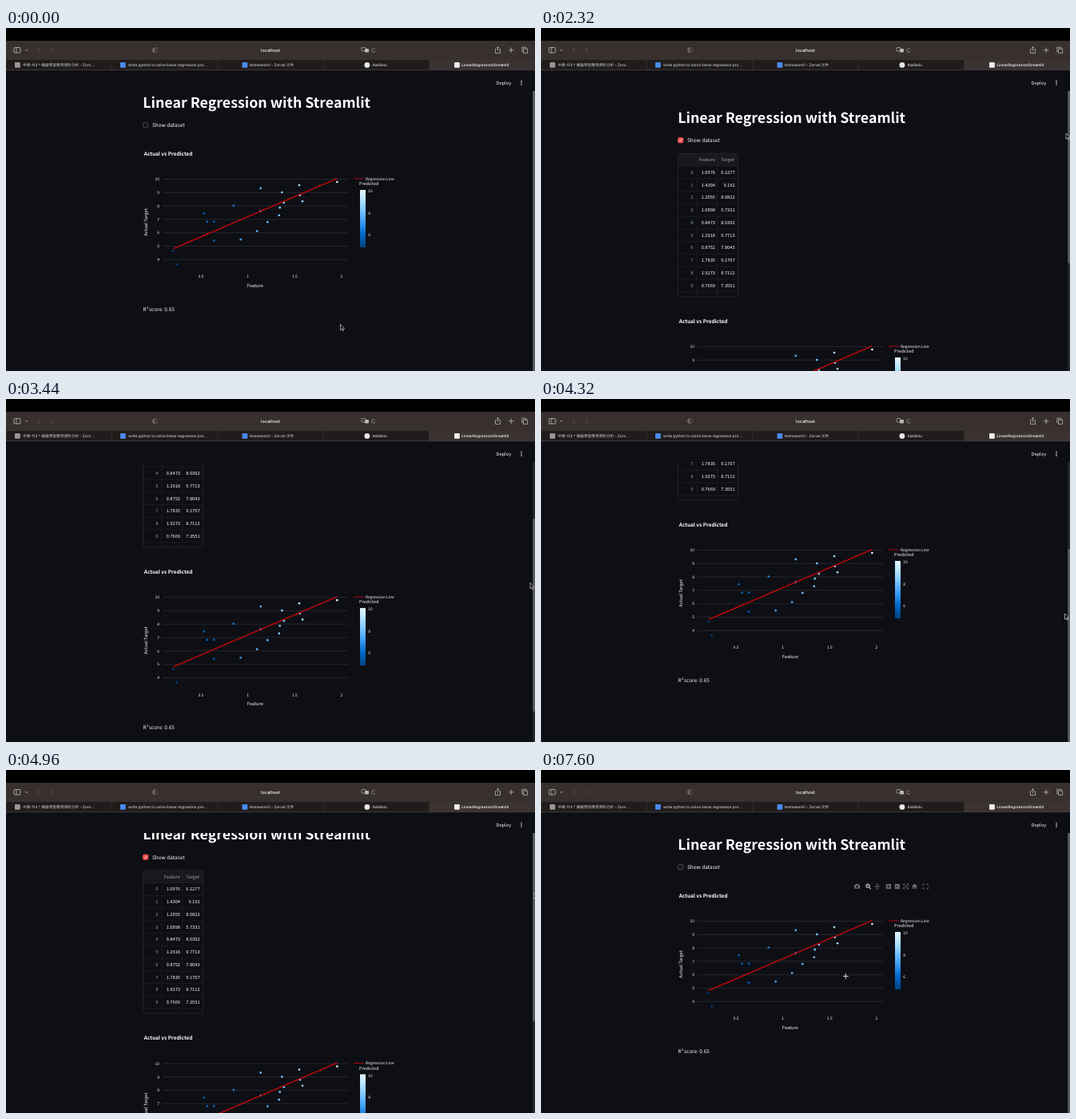
These frames come from a looping animation (662 px wide and 430 px high, 8 s). An HTML page:

```html
<!DOCTYPE html>
<html lang="en">
<head>
<meta charset="utf-8">
<title>Linear Regression with Streamlit</title>
<style>
html, body { margin: 0; width: 100%; height: 100%; overflow: hidden; background: #0d0f15; }
svg { display: block; }
text { font-family: "Noto Sans CJK TC", "Noto Sans CJK JP", "Noto Sans CJK SC", "Noto Sans CJK", "Noto Sans", sans-serif;
  font-weight: 500; text-rendering: geometricPrecision; white-space: pre; }
.bold { font-weight: 700; }
.ui { font-family: Inter, "Noto Sans CJK TC", "Noto Sans CJK JP", sans-serif; }
</style>
</head>
<body>
<svg id="stage" width="662" height="430" viewBox="0 0 662 430"></svg>
<script>
const BG = '#0d0f15', GREY = '#686a71', PALE = '#c8c4c4';
const END = 'text-anchor="end"', MID = 'text-anchor="middle"', BOLD = 'class="bold"';
const range = n => [...Array(n).keys()];
const each = (list, f) => list.map(f).join('');

// y is the middle of the capitals
const text = (x, y, s, size, extra = '') =>
  `<text x="${x}" y="${y + size * 0.365}" font-size="${size}" fill="#fff" ${extra}>${s}</text>`;
const rect = (x, y, w, h, fill, extra = '') =>
  `<rect x="${x}" y="${y}" width="${w}" height="${h}" fill="${fill}" ${extra}/>`;
const line = (d, color, w = 0.7, extra = '') =>
  `<path d="${d}" fill="none" stroke="${color}" stroke-width="${w}" ${extra}/>`;
const dot = (x, y, r, fill, extra = '') => `<circle cx="${x}" cy="${y}" r="${r}" fill="${fill}" ${extra}/>`;

// Mersenne Twister, as in NumPy
function twister(seed) {
  const s = new Uint32Array(624);
  let k = 624;
  s[0] = seed;
  for (let i = 1; i < 624; i++) s[i] = Math.imul(1812433253, s[i - 1] ^ (s[i - 1] >>> 30)) + i;
  return () => {
    if (k == 624) {
      for (let i = 0; i < 624; i++) {
        const y = (s[i] & 0x80000000) | (s[(i + 1) % 624] & 0x7fffffff);
        s[i] = s[(i + 397) % 624] ^ (y >>> 1) ^ (y & 1 ? 0x9908b0df : 0);
      }
      k = 0;
    }
    let y = s[k++];
    y ^= y >>> 11;
    y ^= (y << 7) & 0x9d2c5680;
    y ^= (y << 15) & 0xefc60000;
    return (y ^ (y >>> 18)) >>> 0;
  };
}

// Data: target = 4 + 3 * feature + Gaussian noise
const next = twister(0);
const random = () => ((next() >>> 5) * 2 ** 26 + (next() >>> 6)) / 2 ** 53;
let spare = null;
function gauss() {
  if (spare !== null) {
    const g = spare;
    spare = null;
    return g;
  }
  let a, b, r;
  do {
    a = 2 * random() - 1;
    b = 2 * random() - 1;
    r = a * a + b * b;
  } while (r >= 1 || r == 0);
  const f = Math.sqrt(-2 * Math.log(r) / r);
  spare = f * a;
  return f * b;
}
const rows = range(100).map(() => [2 * random()]);
rows.forEach(row => row.push(4 + 3 * row[0] + gauss()));

// Shuffle, test on 20 rows, fit the line to the rest
const order = range(100), draw32 = twister(42);
for (let i = 99; i > 0; i--) {
  const mask = 2 ** (32 - Math.clz32(i)) - 1;
  let j;
  do j = draw32() & mask; while (j > i);
  [order[i], order[j]] = [order[j], order[i]];
}
const test = order.slice(0, 20).map(i => rows[i]), train = order.slice(20).map(i => rows[i]);
const mean = j => train.reduce((sum, row) => sum + row[j], 0) / train.length;
const mx = mean(0), my = mean(1);
const slope = train.reduce((s, [x, y]) => s + (x - mx) * (y - my), 0) / train.reduce((s, [x]) => s + (x - mx) ** 2, 0);
const fit = x => my + slope * (x - mx);
const xs = test.map(row => row[0]), lo = Math.min(...xs), hi = Math.max(...xs);

// Heading, with its middle at y = 0
const heading = text(171.3, 0, 'Linear Regression with Streamlit', 17.78, BOLD) +
  rect(171.5, 25.2, 6.4, 6.4, 'none', 'id="box" rx="1.4" stroke-width=".7"') +
  line('M172.9 28.4l1.4 1.5 2.4-3', '#fff', 0.9, 'id="tick"') +
  text(183, 28.5, 'Show dataset', 6.45);

const STEP = 15.75;
const table = rect(171.5, 45, 75, 16, '#17191f', 'rx="2"') +
  line('M195 45V224.5M220.5 45V224.5' + each(range(11), i => `M171.5 ${60.8 + i * STEP}H246.5`), '#22242a', 0.6) +
  rect(171.5, 45, 75, 179.5, 'none', 'rx="2" stroke="#2a2c33" stroke-width=".7"') +
  text(197.7, 52.8, 'Feature', 5.7, 'opacity=".6"') + text(225.3, 52.8, 'Target', 5.7, 'opacity=".6"') +
  each(rows.slice(0, 10), (row, i) => {
    const y = 68.6 + i * STEP;
    return text(190.3, y, i, 5.7, END + ' opacity=".6"') +
      each(row, (v, j) => text(218 + 24.6 * j, y, +v.toFixed(4), 5.7, END));
  });

// Chart, laid out for the page without the table
const BLUES = ['#004280', '#0054a3', '#0068c9', '#1c83e1', '#3d9df3', '#60b4ff', '#83c9ff', '#a6dcff', '#c7ebff', '#e4f5ff'];
const px = x => 185.5 + x * 117.2, py = y => 189.5 + (10 - y) * 16.8;
const chart = text(172.8, 157.5, 'Actual vs Predicted', 6.45, BOLD) +
  each([4, 5, 6, 7, 8, 9, 10], v => line(`M196 ${py(v)}H428`, '#2a2c33', 0.8) + text(192, py(v), v, 4.9, END)) +
  each([0.5, 1, 1.5, 2], v => text(px(v), 311.7, v, 4.9, MID)) +
  text(311.8, 322.7, 'Feature', 5.7, MID) +
  `<g transform="translate(175.3 243.5) rotate(-90)">${text(0, 0, 'Actual Target', 5.7, MID)}</g>` +
  each(test, ([x, y]) => dot(px(x), py(y), 1.35, BLUES[Math.round((x - lo) / (hi - lo) * 9)])) +
  line(`M${px(lo)} ${py(fit(lo))}L${px(hi)} ${py(fit(hi))}`, '#c8060a', 1.4) + line('M435 189H448', '#b0060a', 1) +
  text(450, 189.2, 'Regression Line', 4.9) + text(442, 195.2, 'Predicted', 5.4) +
  rect(443, 203, 7, 72, 'url(#blues)') +
  each([10, 8, 6], v => text(453.3, 204.3 + (10 - v) * 13.75, v, 4.9)) +
  text(171.5, 352.7, 'R', 6.45) + text(176, 350.5, '2', 4.3) + text(179, 352.7, 'score: 0.65', 6.45);

const corners = x => line(`M${x} 145v-2h2m2.3 0h2v2m0 2v2h-2m-2.3 0h-2v-2`, GREY, 0.9);
const tools = rect(392, 143.8, 7, 5, GREY, 'rx=".8"') + rect(394, 142.9, 3, 2, GREY) + dot(395.5, 146.3, 1.3, BG) +
  dot(409, 145.3, 2.2, 'none', 'stroke="#b4b6bb" stroke-width="1.1"') +
  line('M410.6 147l2.3 2.3', '#b4b6bb', 1.2) + line('M407.9 145.3h2.2M409 144.2v2.2', '#b4b6bb', 0.6) +
  line('M417.3 146h7M420.8 142.5v7M419.6 143.6l1.2-1.2 1.2 1.2M419.6 148.4l1.2 1.2 1.2-1.2', GREY, 0.9) +
  rect(431.8, 142.9, 6.2, 6.2, GREY) + line('M433 146h3.8M434.9 144.1v3.8', BG, 0.9) +
  rect(442.8, 142.9, 6.2, 6.2, GREY) + line('M444 146h3.8', BG, 0.9) +
  corners(453.5) + line('M454.5 144l4.2 4M458.7 144l-4.2 4', GREY, 0.9) +
  `<path d="M467.5 142.6l3.6 3.4h-1v3h-1.8v-2.1h-1.6v2.1h-1.8v-3h-1z" fill="${GREY}"/>` + corners(478);

// Browser window and page header
const tab = (i, x, color, label, dx = 10) =>
  rect(i * 132.4, 40, 132.4, 12.6, i == 4 ? '#3b3232' : '#211c1c') + line(`M${i * 132.4} 40v12.6`, '#3b3434', 0.8) +
  rect(x, 43, 6.8, 6.8, color, `rx="${i == 3 ? 3.4 : 1}"`) +
  text(x + dx, 46.3, label, 4.7, `class="ui" opacity="${i == 4 ? 1 : 0.78}"`);
const frame = rect(0, 0, 662, 79, BG) + rect(0, 0, 662, 16, '#000') + rect(0, 16, 662, 24, '#382f2f') +
  line('M198 22v12M465 22v12', '#443c3c', 0.6) +
  rect(10, 24.5, 8, 6.5, 'none', `rx="1.2" stroke="${PALE}" stroke-width=".8"`) + line('M13 24.5v6.5', PALE) +
  line('M24 27l1.6 1.6 1.6-1.6', PALE, 0.8) +
  line('M42.5 24.8l-3 3 3 3M55.5 24.8l3 3-3 3', '#625a5a', 0.9) +
  dot(186.5, 27.7, 3.2, 'none', 'stroke="#6d6565" stroke-width=".7"') +
  '<path d="M186.5 24.5a3.2 3.2 0 0 0 0 6.4z" fill="#6d6565"/>' +
  text(331, 28, 'localhost', 5.5, MID + ' class="ui"') +
  rect(445, 24.5, 5, 4.5, 'none', 'rx="1" stroke="#bdb8b8" stroke-width=".7"') + rect(449, 26, 5, 4.5, '#bdb8b8', 'rx="1"') +
  line('M461.6 26.4a2.3 2.3 0 1 0 .5 2.3', '#aaa4a4') +
  line('M614 26.5h-1.5v5h6v-5H617M615.5 29v-5.5M613.9 25l1.6-1.6 1.6 1.6', PALE) +
  line('M629 27.8h6.4M632.2 24.6v6.4', PALE, 0.8) +
  line('M647.6 26h5v5.5h-5zM647.6 29.5h-1.8V24.2h5V26', PALE) +
  tab(0, 11, '#9a9696', '中興-113 * 機器學習應用資料分析 - Zorv...') +
  tab(1, 143, '#4a8af0', 'write python to solve linear regression pro...') +
  tab(2, 295.5, '#4a8af0', 'Homework1 - Zorvel 文件', 9) +
  tab(3, 448.5, '#e8e6e6', 'AskBelu') +
  tab(4, 561, '#f0eeee', 'LinearRegressionStreamlit', 9.3) +
  rect(0, 52.3, 662, 0.8, '#4a4343') +
  text(613.5, 69, 'Deploy', 5.7) +
  each([66.5, 68.8, 71.1], y => dot(645, y, 0.75, '#fff'));

const cursors = '<path id="arrow" d="M0 0V7.2L1.7 5.7 2.8 8.2 3.9 7.7 2.9 5.3H5Z" fill="#000" stroke="#fff" stroke-width=".6"/>' +
  '<path id="hand" d="M-.8 .6Q0-.5.8.6V2.8L3 3.2Q3.9 3.5 3.7 4.4L3 7H-.6L-2.5 4.4Q-2.4 3.4-1.5 3.9L-.8 4.5Z" fill="#fff" stroke="#222" stroke-width=".6"/>' +
  '<path id="cross" d="M-3.5 0h7M0-3.5v7" stroke="#e8e8e8" stroke-width=".9"/>';

stage.innerHTML = '<defs><linearGradient id="blues" x2="0" y1="1" y2="0">' +
  each(BLUES, (c, i) => `<stop offset="${i / 9}" stop-color="${c}"/>`) + '</linearGradient></defs>' +
  rect(0, 0, 662, 430, BG) +
  `<g id="top">${heading}<g id="data">${table}</g></g><g id="plot">${chart}<g id="bar">${tools}</g></g>` +
  rect(659, 53, 3, 377, '#24262b') + rect(659.3, 0, 2.7, 0, '#5c5d61', 'id="thumb" rx="1.3"') +
  frame + `<g id="pointer">${cursors}</g>`;

const el = id => document.getElementById(id);
const show = (id, on) => el(id).setAttribute('display', on ? 'inline' : 'none');
const move = (id, x, y) => el(id).setAttribute('transform', `translate(${x} ${y})`);
const set = (id, attrs) => Object.entries(attrs).forEach(([k, v]) => el(id).setAttribute(k, v));

const START = { x: 418.5, y: 371.5, scroll: 19 };
const MOVES = [
  { from: 40, to: 880, x: 175, y: 120 },
  { from: 1000, to: 1760, x: 657, y: 146 },
  { from: 1760, to: 2300, y: 132, scroll: 0 },
  { from: 2520, to: 3935, x: 655.5, y: 269, scroll: 210 },
  { from: 4400, to: 4960, x: 661, y: 154, scroll: 31.5 },
  { from: 4960, to: 5960, x: 176.5, y: 111.3 },
  { from: 6800, to: 7560, x: 381.3, y: 258.5 },
];
function pose(t) {
  const now = { ...START };
  for (const { from, to, ...goal } of MOVES) {
    const p = Math.max(0, Math.min(1, (t - from) / (to - from)));
    for (const k in goal) now[k] += (goal[k] - now[k]) * p * p * (3 - 2 * p);
  }
  return now;
}

function draw(now) {
  const t = Math.floor(now % 8000 / 80) * 80;
  const checked = t >= 1040 && t < 6800;
  const limit = checked ? 210 : 19;
  const { x, y, scroll } = pose(t);
  const offset = Math.min(scroll, limit);
  const topY = 112.3 - offset, shift = topY - 93.3 + (checked ? 191 : 0);

  move('top', 0, topY);
  move('plot', 0, shift);
  show('data', checked);
  show('tick', checked);
  set('box', checked ? { fill: '#ff4b4b', stroke: '#ff4b4b' } : { fill: '#14161c', stroke: '#5a5c64' });

  const ratio = 377 / (377 + limit);
  set('thumb', { y: 53 + offset * ratio, height: 377 * ratio });

  const cy = y - shift;
  const hand = x > 169 && x < 225 && Math.abs(y - topY - 28.5) < 8;
  const cross = x > 196 && x < 428 && cy > 180 && cy < 300;
  show('bar', x > 171 && x < 491 && cy > 138 && cy < 335);
  show('hand', hand);
  show('cross', cross);
  show('arrow', !hand && !cross);
  move('pointer', x, y);
}

const start = performance.now();
(function tick() {
  draw(performance.now() - start);
  requestAnimationFrame(tick);
})();
</script>
</body>
</html>
```
